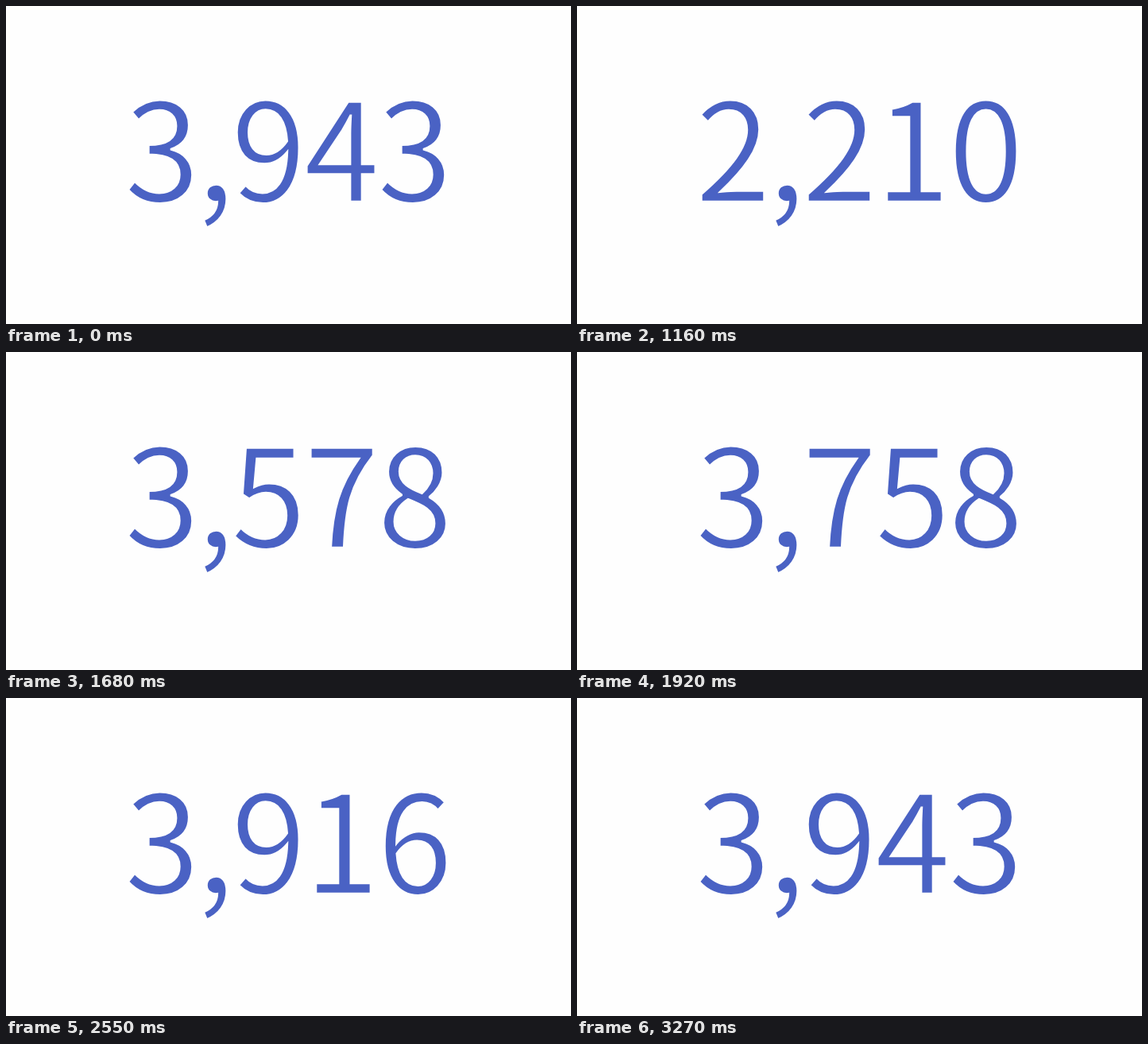
These frames come from a looping animation (711x400 px, 5950 ms). An HTML page:

```html
<!DOCTYPE html>
<html lang="en">
<head>
<meta charset="utf-8">
<title>Counter</title>
<style>
  html, body { margin: 0; width: 100%; height: 100%; overflow: hidden; background: #fefefe; }
  svg { display: block; width: 711px; height: 400px; }
  /* The background-coloured outline thins the regular weight to a light one */
  text {
    font: 171.1px "Noto Sans CJK SC", "Noto Sans CJK JP", "Noto Sans CJK", sans-serif;
    fill: #4a62c4; stroke: #fefefe; stroke-width: 2.4px;
    text-anchor: middle; text-rendering: geometricPrecision;
  }
</style>
</head>
<body>
<svg viewBox="0 0 711 400"><text id="count" y="246.2"></text></svg>
<script>
const LOOP = 5950, START = 900, HOLD = 1020, END = 3270;
const ORIGIN = 866, TICK = 58;
const CENTER = 355.5, DIGIT = 92, COMMA = 42;

// The count nears LIMIT exponentially through these [tick, value] points
const TOTAL = 3943, LIMIT = TOTAL * 1024 / 1023;
const KEYS = [[1, 614], [8, 2882], [14, 3578], [22, 3850], [29, 3916], [41, TOTAL]];

const label = document.getElementById('count');

function valueAt(t) {
  if (t < START || t >= END) return TOTAL;
  const tick = t < HOLD ? 1 : Math.floor((t - ORIGIN) / TICK);
  const i = KEYS.findIndex(([n], k) => k > 0 && tick <= n);
  const [n0, v0] = KEYS[i - 1], [n1, v1] = KEYS[i];
  const part = (tick - n0) / (n1 - n0);
  return Math.round(LIMIT - (LIMIT - v0) * ((LIMIT - v1) / (LIMIT - v0)) ** part);
}

function show(value) {
  const str = value.toLocaleString('en-US');
  if (label.textContent === str) return;
  const widths = [...str].map(c => c === ',' ? COMMA : DIGIT);
  let x = CENTER - widths.reduce((a, b) => a + b) / 2;
  label.setAttribute('x', widths.map(w => (x += w) - w / 2).join(' '));
  label.textContent = str;
}

const start = performance.now();
function frame(now) {
  show(valueAt(Math.max(0, now - start) % LOOP));
  requestAnimationFrame(frame);
}

show(TOTAL);
requestAnimationFrame(frame);
</script>
</body>
</html>
```
